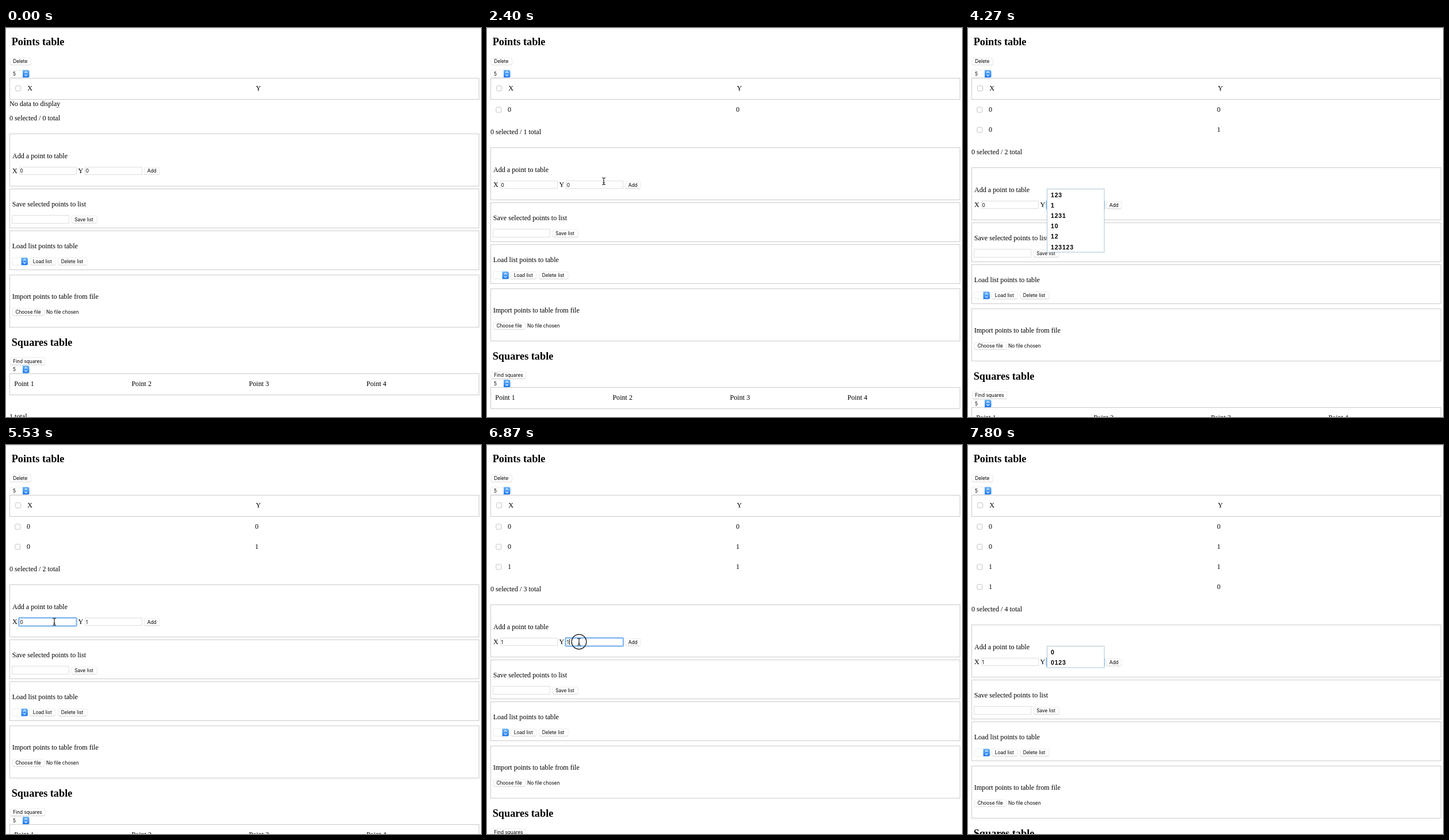
Recreate the animation shown at these times as an HTML page. Size 826 by 678 pixels, loop 8000 ms.

```html
<!DOCTYPE html>
<html lang="en">
<head>
<meta charset="utf-8">
<title>Points table</title>
<style>
  html, body { margin: 0; width: 100%; height: 100%; overflow: hidden; background: #fff; }
  svg { display: block; width: 826px; height: 678px; }
  text { white-space: pre; fill: #000; }
  .serif { font: 12.1px "Liberation Serif", serif; }
  .head { font: bold 18.25px "Liberation Serif", serif; }
  .ui { font: 8.3px Inter, sans-serif; }
  .hint { font: bold 10.5px "Liberation Sans", sans-serif; letter-spacing: .8px; }
  .box { fill: none; stroke: #cbcbcb; shape-rendering: crispEdges; }
  .input { fill: #fff; stroke: #dedede; shape-rendering: crispEdges; }
  .ring { fill: none; stroke: #84b9f0; stroke-width: 2.4; }
  .check { fill: #fff; stroke: #bdbdbd; stroke-width: .9; }
  .popup { fill: #fff; stroke: #a9c6d3; }
</style>
</head>
<body>
<svg id="stage" viewBox="0 0 826 678">
  <defs>
    <linearGradient id="blue" x2="0" y2="1">
      <stop stop-color="#6db5fa"/><stop offset="1" stop-color="#1d79f2"/>
    </linearGradient>
  </defs>
</svg>
<script>
const LOOP = 8000;
const stage = document.getElementById('stage');

function add(parent, tag, attrs = {}, content) {
  const el = document.createElementNS('http://www.w3.org/2000/svg', tag);
  for (const key in attrs) el.setAttribute(key, attrs[key]);
  if (content !== undefined) el.textContent = content;
  return parent.appendChild(el);
}
const group = parent => add(parent, 'g');
const text = (p, x, y, s, cls = 'serif') => add(p, 'text', { x, y, class: cls }, s);
const rect = (p, x, y, width, height, cls, rx = 0) =>
  add(p, 'rect', { x, y, width, height, class: cls, rx });
const show = (el, on) => el.setAttribute('visibility', on ? 'inherit' : 'hidden');
const place = (el, x, y) => el.setAttribute('transform', `translate(${x} ${y})`);

function button(p, x, y, w, label) {
  add(p, 'rect', { x, y: y + .6, width: w, height: 12.4, rx: 2.4, fill: '#cfcfcf' });
  add(p, 'rect', { x, y, width: w, height: 12.2, rx: 2.4, fill: '#fff', stroke: '#e2e2e2', 'stroke-width': .7 });
  text(p, x + 5.2, y + 9.2, label, 'ui');
}

function select(p, x, y, w, label) {
  add(p, 'rect', { x: x + .5, y, width: w - 1, height: 13, rx: 2.5, fill: '#fff', stroke: '#e2e2e2', 'stroke-width': .7 });
  const bx = x + w - 11.5, cx = bx + 5.7;
  add(p, 'path', { d: `M${bx} ${y}h9q2.5 0 2.5 2.5v8q0 2.5-2.5 2.5h-9z`, fill: 'url(#blue)' });
  add(p, 'path', {
    d: `M${cx - 2.2} ${y + 5}l2.2-2.2 2.2 2.2M${cx - 2.2} ${y + 8}l2.2 2.2 2.2-2.2`,
    fill: 'none', stroke: '#fff', 'stroke-width': 1.1
  });
  text(p, x + 6, y + 9.8, label, 'ui');
}

function field(p, x) {
  rect(p, x + .5, 242.5, 99, 13, 'input');
  return {
    ring: rect(p, x - .2, 241.8, 100.4, 14.4, 'ring', 1.5),
    value: text(p, x + 2, 252.3, '0', 'ui'),
    caret: add(p, 'rect', { x: x + 7, y: 244, width: .9, height: 10 })
  };
}

function hints(y, list) {
  const g = group(stage);
  rect(g, 137.5, y, 99.5, list.length * 18.2 + 1, 'popup');
  list.forEach((s, i) => text(g, 144, y + 13.9 + i * 18.2, s, 'hint'));
  return g;
}

// Points table
add(stage, 'rect', { width: 826, height: .5, fill: '#c4c4c4' });
text(stage, 9.7, 30.4, 'Points table', 'head');
button(stage, 7, 52, 36.5, 'Delete');
select(stage, 6, 73.3, 34.5, '5');
rect(stage, 6.5, 87, 816, 37, 'box');
rect(stage, 16.7, 100.7, 9, 9, 'check', 2);
text(stage, 37.3, 109, 'X');
text(stage, 434.4, 109, 'Y');
const empty = text(stage, 6, 135.5, 'No data to display');

const rows = [[0, 0], [0, 1], [1, 1], [1, 0]].map(([x, y], i) => {
  const g = group(stage), top = 35 * i;
  rect(g, 15.8, 138 + top, 9, 9, 'check', 2);
  text(g, 36, 146 + top, x);
  text(g, 433, 146 + top, y);
  return g;
});

// Everything below the rows moves down as the table grows
const page = group(stage);
const total = text(page, 6, 161, '');
for (const [y, h] of [[184, 91.5], [280, 68.5], [353, 68.5], [430, 91], [602.5, 37]])
  rect(page, 6.5, y, 816, h, 'box');
text(page, 11, 226.8, 'Add a point to table');
text(page, 11, 252.5, 'X');
text(page, 125.5, 252.5, 'Y');
const fx = field(page, 22.5), fy = field(page, 136.8);
button(page, 240.5, 243, 26.5, 'Add');

text(page, 10.7, 311, 'Save selected points to list');
rect(page, 10.5, 326.5, 99, 14, 'input');
button(page, 114, 327.5, 44.5, 'Save list');

text(page, 10.7, 384, 'Load list points to table');
select(page, 10.5, 400.2, 27.5, '');
button(page, 41.5, 400.5, 44.5, 'Load list');
button(page, 90.5, 400.5, 50.5, 'Delete list');

text(page, 10.7, 472, 'Import points to table from file');
button(page, 11.2, 488.6, 55.3, 'Choose file');
text(page, 70, 497.8, 'No file chosen', 'ui');

text(page, 9.7, 553.6, 'Squares table', 'head');
button(page, 7, 574.5, 61, 'Find squares');
select(page, 6, 588.6, 34.5, '5');
for (let i = 0; i < 4; i++) text(page, 14.2 + 204.2 * i, 624, 'Point ' + (i + 1));
text(page, 6, 680.6, '1 total');

const popups = [
  { el: hints(280.6, ['123', '1', '1231', '10', '12', '123123']), from: 3600, to: 5000 },
  { el: hints(350.6, ['0', '0123']), from: 7470, to: LOOP }
];

// Pointer
const circle = add(stage, 'circle', { fill: 'none', stroke: '#111', 'stroke-width': 1.3 });
const arrow = add(stage, 'path', {
  d: 'M0 0V10.2L2.4 8 4 11.6 5.7 10.8 4.2 7.3H7.4Z',
  stroke: '#fff', 'stroke-width': .7
});
const beam = add(stage, 'path', {
  d: 'M-3-6Q0-6 0-4.5Q0-6 3-6M0-4.5V4.5M-3 6Q0 6 0 4.5Q0 6 3 6M-1.5 2.5H1.5',
  fill: 'none', stroke: '#111', 'stroke-width': 1.1
});

const adds = [1930, 4130, 5730, 7670];
const clicks = [[1130, 1400], [1800, 1930], [3000, 3200], [5000, 5200], [6790, 7000]];
const visible = [[70, 3470], [4530, 5600], [6000, 7200]];
const path = [
  [70, 318, 300], [870, 262, 249], [2000, 262, 249], [2400, 203, 267],
  [2600, 203, 267], [2800, 190, 272], [4530, 190, 273], [4950, 84, 308],
  [6000, 84, 308], [6750, 160, 343], [LOOP, 160, 343]
];
const xValues = [[0, '0'], [5670, '1']];
const yValues = [[0, '0'], [3470, ''], [3600, '1'], [7270, ''], [7470, '0']];

const span = (list, t) => list.find(([a, b]) => t >= a && t < b);
const latest = (list, t) => list.filter(([a]) => t >= a).pop();

function pointer(t) {
  const i = path.findIndex(k => t < k[0]);
  if (i < 1) return path[0].slice(1);
  const [t0, x0, y0] = path[i - 1], [t1, x1, y1] = path[i];
  const u = (t - t0) / (t1 - t0), e = u * u * (3 - 2 * u);
  return [x0 + (x1 - x0) * e, y0 + (y1 - y0) * e];
}

function updateField(f, values, focused, since, t) {
  const [changed, value] = latest(values, t);
  f.value.textContent = value;
  show(f.ring, focused);
  f.caret.setAttribute('x', +f.value.getAttribute('x') + (value === '1' ? 4.2 : value ? 5.6 : 0));
  show(f.caret, focused && (t - Math.max(since, changed)) % 1000 < 500);
}

function draw(t) {
  const n = adds.filter(a => t >= a).length;
  const shift = n ? 24.4 + 35 * (n - 1) : 0;
  show(empty, !n);
  rows.forEach((row, i) => show(row, i < n));
  place(page, 0, shift);
  total.textContent = `0 selected / ${n} total`;

  const xFocus = t >= 5000 && t < 6860;
  const yStart = t >= 6860 ? 6860 : 3000;
  updateField(fx, xValues, xFocus, 5000, t);
  updateField(fy, yValues, t >= yStart && !xFocus, yStart, t);
  for (const p of popups) show(p.el, t >= p.from && t < p.to);

  const [x, y] = pointer(t);
  const seen = !!span(visible, t);
  const popupOpen = popups.some(p => t >= p.from && t < p.to);
  const overField = Math.abs(y - 249 - shift) < 8 && (x > 22 && x < 123 || x > 136 && x < 237);
  const isBeam = overField && !(popupOpen && x > 136);
  show(arrow, seen && !isBeam);
  show(beam, seen && isBeam);
  place(arrow, x, y);
  place(beam, x, y);

  const click = span(clicks, t);
  show(circle, seen && !!click);
  if (click) {
    const grow = Math.min(1, Math.max(0, (t - click[0] - 90) / 60));
    circle.setAttribute('r', 12.8 + 3.7 * grow);
    place(circle, x, y);
  }
}

function frame() {
  draw(performance.now() % LOOP);
  requestAnimationFrame(frame);
}
frame();
</script>
</body>
</html>
```
